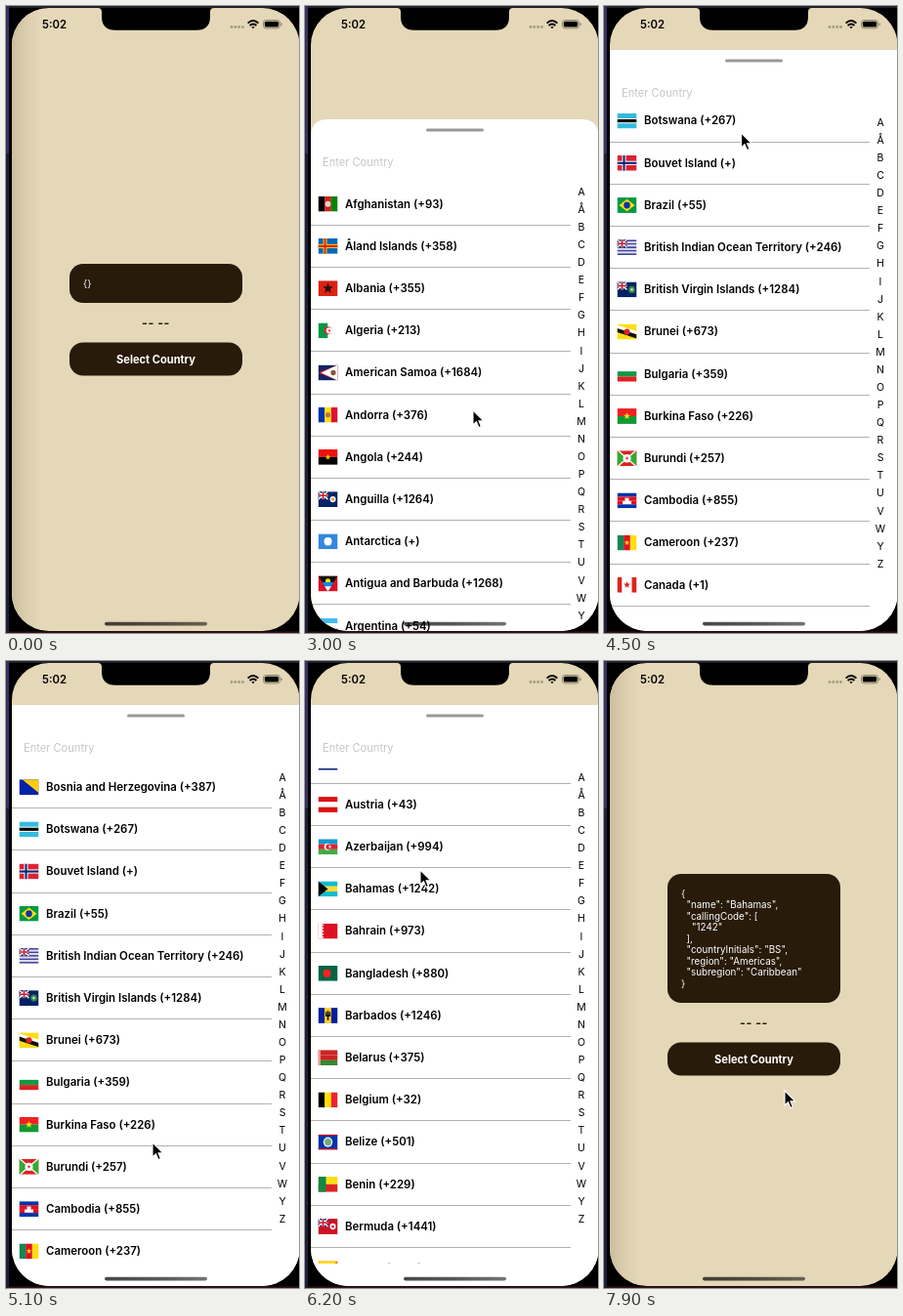
An HTML page that plays this animation: 300 by 642 pixels, repeating every 8000 ms.

```html
<!DOCTYPE html>
<html lang="en">
<head>
<meta charset="utf-8">
<title>Country picker</title>
<style>
html, body { margin: 0; width: 100%; height: 100%; overflow: hidden; background: #000 }
svg { display: block }
#stage { width: 100vw; height: 100vh }
text { font: 11.45px Inter, "Open Sans", sans-serif; white-space: pre }
.b { font-weight: 600 }
.line { shape-rendering: crispEdges }
</style>
</head>
<body>
<svg id="stage" viewBox="0 0 300 642">
  <defs>
    <clipPath id="screen"><rect x="6" y="2" width="294.5" height="638" rx="38"/></clipPath>
    <linearGradient id="shade">
      <stop offset="0" stop-color="#cbbf9f"/>
      <stop offset=".5" stop-color="#dbceae"/>
      <stop offset="1" stop-color="#e5d8b8"/>
    </linearGradient>
    <linearGradient id="bar">
      <stop offset="0" stop-opacity=".72"/>
      <stop offset=".5" stop-opacity=".66"/>
      <stop offset="1" stop-opacity=".55"/>
    </linearGradient>
  </defs>

  <rect width="300" height="642"/>
  <rect width="300" height="2" fill="#22222c"/>
  <rect width="3" height="151" fill="#392f62"/>
  <rect y="151" width="3" height="491" fill="#1c2038"/>
  <rect y="640.5" width="300" height="1.5" fill="#35141c"/>

  <g clip-path="url(#screen)">
    <rect width="300" height="642" fill="#e5d8b8"/>
    <rect id="edge" x="6" width="30" height="642" fill="url(#shade)"/>
    <g id="empty"></g>
    <g id="filled"></g>
    <g id="sheet">
      <path id="panel" fill="#fff"/>
      <rect x="124" y="9.5" width="59" height="3" rx="1.5" fill="#999"/>
      <text x="18" y="48" fill="#c6c6c8" style="font-size:11.1px">Enter Country</text>
      <svg y="65" width="300" height="507"><g id="list"></g></svg>
      <g id="letters"></g>
    </g>
  </g>

  <path d="M94 2Q98 2 98 6V11Q98 24.8 112 24.8H195Q209 24.8 209 11V6Q209 2 213 2Z"/>
  <text class="b" x="37" y="23" style="font-size:11.3px">5:02</text>
  <g fill="#a59b83">
    <circle cx="231" cy="21.5" r="1.4"/><circle cx="234.8" cy="21.5" r="1.4"/>
    <circle cx="238.6" cy="21.5" r="1.4"/><circle cx="242.4" cy="21.5" r="1.4"/>
  </g>
  <g fill="none" stroke="#000" stroke-width="1.9">
    <path d="M247.6 17.6Q253 12.6 258.4 17.6M249.6 20Q253 17 256.4 20"/>
    <path d="M253 23.2L251.4 21.5Q253 20.3 254.6 21.5Z" fill="#000" stroke="none"/>
  </g>
  <rect x="263.5" y="14.5" width="17" height="8.4" rx="2.6" fill="none" stroke="#8d846f"/>
  <rect x="264.8" y="15.8" width="14.4" height="5.8" rx="1.5"/>
  <rect x="281.6" y="17.2" width="1.2" height="3" rx=".6" fill="#8d846f"/>
  <rect x="101" y="630.8" width="105" height="3.6" rx="1.8" fill="url(#bar)"/>

  <g id="cursor">
    <g id="ring" fill="none">
      <circle cy="3" r="20" stroke="#fff" stroke-width="6"/>
      <circle cy="3" r="20.2" stroke="#000" stroke-width="2.8"/>
    </g>
    <path d="M0 0V15L3.5 11.8L6 17.6L8.4 16.6L6 10.9H10.8Z" stroke="#fff" stroke-width="1.1"/>
  </g>
</svg>

<script>
const $ = id => document.getElementById(id);
const ROW = 43.2, LINE = 11.5;

// name | code | flag layers on a 20 x 15 field
const countries = `
Afghanistan|93|v 000 c22 080;c 2.8 ecc
Åland Islands|358|h 06b;x fc0 d22
Albania|355|h d21;s 5.5 211
Algeria|213|v 094 fff;c 3.8 d23;c 3 fff 11.2;s 1.8 d23 11.5
American Samoa|1684|h 126;t d22 -20;t fff -17;c 2.6 853 15.5
Andorra|376|v 03a fd1 d13;c 2.6 b73
Angola|244|h e11 000;s 3 fc1
Anguilla|1264|h 026;u;c 3 fff 15;c 1.6 e92 15
Antarctica|+|h 38d;c 4 fff
Antigua and Barbuda|1268|h d12;p 0,0,20,0,10,15 111;c 2.6 fd1 10 5;p 4,6,16,6,10,15 18d;p 6.6,10,13.4,10,10,15 fff
Argentina|54|h 4be fff 4be;c 1.7 fb3
Armenia|374|h d12 01f fa0
Aruba|297|h 3ad;r 0 9 20 1 fd1;r 0 11 20 1 fd1;s 2.8 d22 4 4
Australia|61|h 027;u;s 2 fff 5 11.3;s 1.6 fff 14.5 3.5;s 1.6 fff 14.5 12;s 1.6 fff 17.5 7
Austria|43|h d11 fff d11
Azerbaijan|994|h 19c d23 4a4;c 3.3 fff 9.5;c 2.6 d23 10.5;s 1.8 fff 12
Bahamas|1242|h 1bc fd3 1bc;t 000 10
Bahrain|973|h d12;r 0 0 4 15 fff;z
Bangladesh|880|h 064;c 4 f22 9
Barbados|1246|v 029 fc2 029;r 9.3 3 1.4 9 000;r 7.5 4 1.2 4 000;r 11.3 4 1.2 4 000;r 7.5 7 5 1.4 000
Belarus|375|h c22 c22 383;r 0 0 2.4 15 e99
Belgium|32|v 000 fd0 e23
Belize|501|h 03a;r 0 0 20 1.5 c12;r 0 13.5 20 1.5 c12;c 4.8 dee;c 3.4 7a7
Benin|229|h fd1 d22;r 0 0 8 15 184
Bermuda|1441|h c12;u;c 3 fff 15;c 1.5 b44 15
Bhutan|975|h f62;p 0,0,20,0,0,15 fd2;s 3.5 fff
Bolivia|591|h d22 fe1 074
Bosnia and Herzegovina|387|h 02a;p 3,0,20,0,20,13 fc1
Botswana|267|h 3bd;r 0 5 20 5 fff;r 0 6 20 3 000
Bouvet Island|+|h d23;x fff 027
Brazil|55|h 094;p 2,7.5,10,1.5,18,7.5,10,13.5 fd1;c 3.3 13a
British Indian Ocean Territory|246|h 449 dde 449 dde 449 dde 449 dde 449;u
British Virgin Islands|1284|h 026;u;c 3.4 384 15;c 1.3 ddc 15
Brunei|673|h fd1;p 0,1,0,5,20,11,20,7 fff;p 0,4,0,8,20,14,20,10 111;c 3 d22
Bulgaria|359|h fff 194 d22
Burkina Faso|226|h e22 193;s 3.6 fd1
Burundi|257|h d22;t 3a3 10;t 3a3 -10;p 0,0,2,0,20,15,18,15 fff;p 20,0,18,0,0,15,2,15 fff;c 4 fff;s 2 d22
Cambodia|855|h 03a d12 d12 03a;r 5.5 8 9 3 fff;r 8 5 4 4 fff
Cameroon|237|v 185 d12 fd1;s 2.8 fd1
Canada|1|v d22 fff fff d22;s 3.6 d22
Cape Verde|238|h 038;r 0 8 20 3.5 fff;r 0 9.2 20 1.1 d22;c 2 fd1 7 9
Caribbean Netherlands|599|h b23 fff 249
Cayman Islands|1345|h 026;u;c 2.8 fff 15
Central African Republic|236|h 038 fff 393 fd1;r 8.5 0 3 15 d22
Chad|235|v 027 fc1 c13`.trim().split("\n").map(l => l.split("|"));

const rect = (x, y, w, h, c) => `<rect x="${x}" y="${y}" width="${w}" height="${h}" fill="#${c}"/>`;
const poly = (p, c) => `<polygon points="${p}" fill="#${c}"/>`;

const layers = {
  h: (...c) => c.map((k, i) => rect(0, i * 15 / c.length, 20, 15 / c.length, k)).join(""),
  v: (...c) => c.map((k, i) => rect(i * 20 / c.length, 0, 20 / c.length, 15, k)).join(""),
  r: rect,
  p: poly,
  c: (r, c, x = 10, y = 7.5) => `<circle cx="${x}" cy="${y}" r="${r}" fill="#${c}"/>`,
  s: (r, c, x = 10, y = 7.5) => poly([...Array(10).keys()].map(i => {
    const a = i * Math.PI / 5, d = i % 2 ? r * .42 : r;
    return [+x + d * Math.sin(a), y - d * Math.cos(a)];
  }), c),
  t: (c, w) => poly(w < 0 ? [20, 0, 20, 15, 20 + +w, 7.5] : [0, 0, 0, 15, w, 7.5], c),
  x: (a, b) => rect(5, 0, 4, 15, a) + rect(0, 5.5, 20, 4, a) + rect(6, 0, 2, 15, b) + rect(0, 6.5, 20, 2, b),
  z: () => [0, 3, 6, 9, 12].map(y => poly([4, y, 6, y + 1.5, 4, y + 3], "fff")).join(""),
  u: () => rect(0, 0, 10, 7.5, "026") +
    `<path d="M0 0L10 7.5M10 0L0 7.5" stroke="#fff" stroke-width="1.3"/>` +
    rect(3.8, 0, 2.4, 7.5, "fff") + rect(0, 2.6, 10, 2.4, "fff") +
    rect(4.3, 0, 1.4, 7.5, "d12") + rect(0, 3.1, 10, 1.4, "d12")
};

const flag = spec => spec.split(";").map(s => {
  const [k, ...args] = s.split(" ");
  return layers[k](...args);
}).join("");

$("list").innerHTML = countries.map(([name, code, spec], i) => `
  <g transform="translate(0 ${i * ROW})">
    <svg x="13.5" y="13.8" width="20" height="15.8" viewBox="0 0 20 15" preserveAspectRatio="none">${flag(spec)}</svg>
    <text class="b" x="41" y="25.6">${name} (+${code === "+" ? "" : code})</text>
    <rect class="line" x="6" y="${ROW - .5}" width="265.5" height="1" fill="#b2b2b2"/>
  </g>`).join("");

$("letters").innerHTML = [..."AÅBCDEFGHIJKLMNOPQRSTUVWYZ"].map((c, i) =>
  `<text x="283" y="${77.8 + i * 18.08}" text-anchor="middle" style="font-size:10.5px">${c}</text>`).join("");

// Card, dashes and button, centred as one column
function form(data) {
  const lines = JSON.stringify(data, null, 2).split("\n");
  const h = lines.length * LINE + 28.5, top = 284 - h / 2, end = top + h;
  return `<rect x="65" y="${top}" width="177" height="${h}" rx="14" fill="#281b0a"/>` +
    lines.map((s, i) => `<text x="79" y="${top + 23.6 + i * LINE}" fill="#fff" style="font-size:9.8px">${s}</text>`).join("") +
    `<text x="153.5" y="${end + 24.5}" text-anchor="middle" fill="#281b0a" style="font-size:12.5px;font-weight:700;letter-spacing:.5px">-- --</text>
    <rect x="65" y="${end + 40.5}" width="177" height="34" rx="14" fill="#281b0a"/>
    <text x="153.5" y="${end + 61.5}" text-anchor="middle" fill="#fff" style="font-size:11.1px;font-weight:700">Select Country</text>`;
}
$("empty").innerHTML = form({});
$("filled").innerHTML = form({
  name: "Bahamas", callingCode: ["1242"], countryInitials: "BS",
  region: "Americas", subregion: "Caribbean"
});

// Monotone cubic curve through [time, value] keys
function curve(keys) {
  const n = keys.length - 1;
  const slope = i => (keys[i + 1][1] - keys[i][1]) / (keys[i + 1][0] - keys[i][0]);
  const tangent = i => {
    if (i < 1 || i >= n) return 0;
    const a = slope(i - 1), b = slope(i);
    return a * b > 0 ? 2 * a * b / (a + b) : 0;
  };
  return t => {
    if (t <= keys[0][0]) return keys[0][1];
    if (t >= keys[n][0]) return keys[n][1];
    const i = keys.findIndex(k => k[0] > t) - 1;
    const [t0, a] = keys[i], [t1, b] = keys[i + 1];
    const d = t1 - t0, u = (t - t0) / d, w = u * u * (3 - 2 * u);
    return a + (b - a) * w + d * u * (1 - u) * ((1 - u) * tangent(i) - u * tangent(i + 1));
  };
}

const sheetY = curve([[2500, 642], [2700, 480], [3000, 116], [3200, 45], [6900, 45], [7200, 275], [7500, 642]]);
const scroll = curve([[3300, 0], [3900, 490], [4300, 1080], [4700, 1290], [5100, 1169], [5600, 720], [6200, 589.5]]);
const mouseX = curve([[700, 185], [1000, 124], [1400, 158.5], [2500, 158.5], [3000, 172], [3300, 170], [3900, 147],
  [4400, 140], [5100, 150], [6200, 118], [6400, 118], [6700, 126], [7900, 185]]);
const mouseY = curve([[700, 529], [1000, 440], [1400, 362.5], [2500, 362.5], [3000, 414], [3300, 585], [3900, 139],
  [4500, 130], [5100, 493], [5300, 530], [6200, 214], [6400, 214], [6700, 232], [7100, 300], [7900, 440]]);

const move = (id, x, y) => $(id).setAttribute("transform", `translate(${x} ${y})`);
const show = (id, on) => $(id).style.display = on ? "" : "none";

function draw(now) {
  const t = Math.floor(now % 8000 / 100) * 100;
  const y = sheetY(t), r = Math.min(18, (y - 45) / 4);
  move("sheet", 0, y);
  $("panel").setAttribute("d", `M6 700V${r}Q6 0 ${6 + r} 0H${300.5 - r}Q300.5 0 300.5 ${r}V700Z`);
  move("list", 0, -scroll(t));
  move("cursor", mouseX(t), mouseY(t));
  show("sheet", y < 642);
  show("edge", y === 642);
  show("cursor", t >= 700);
  show("ring", t >= 2400 && t < 2600 || t >= 6600 && t < 6800);
  show("empty", t < 6800);
  show("filled", t >= 6800);
}

let start;
function tick(now) {
  start ??= now;
  draw(now - start);
  requestAnimationFrame(tick);
}
draw(0);
requestAnimationFrame(tick);
</script>
</body>
</html>
```
